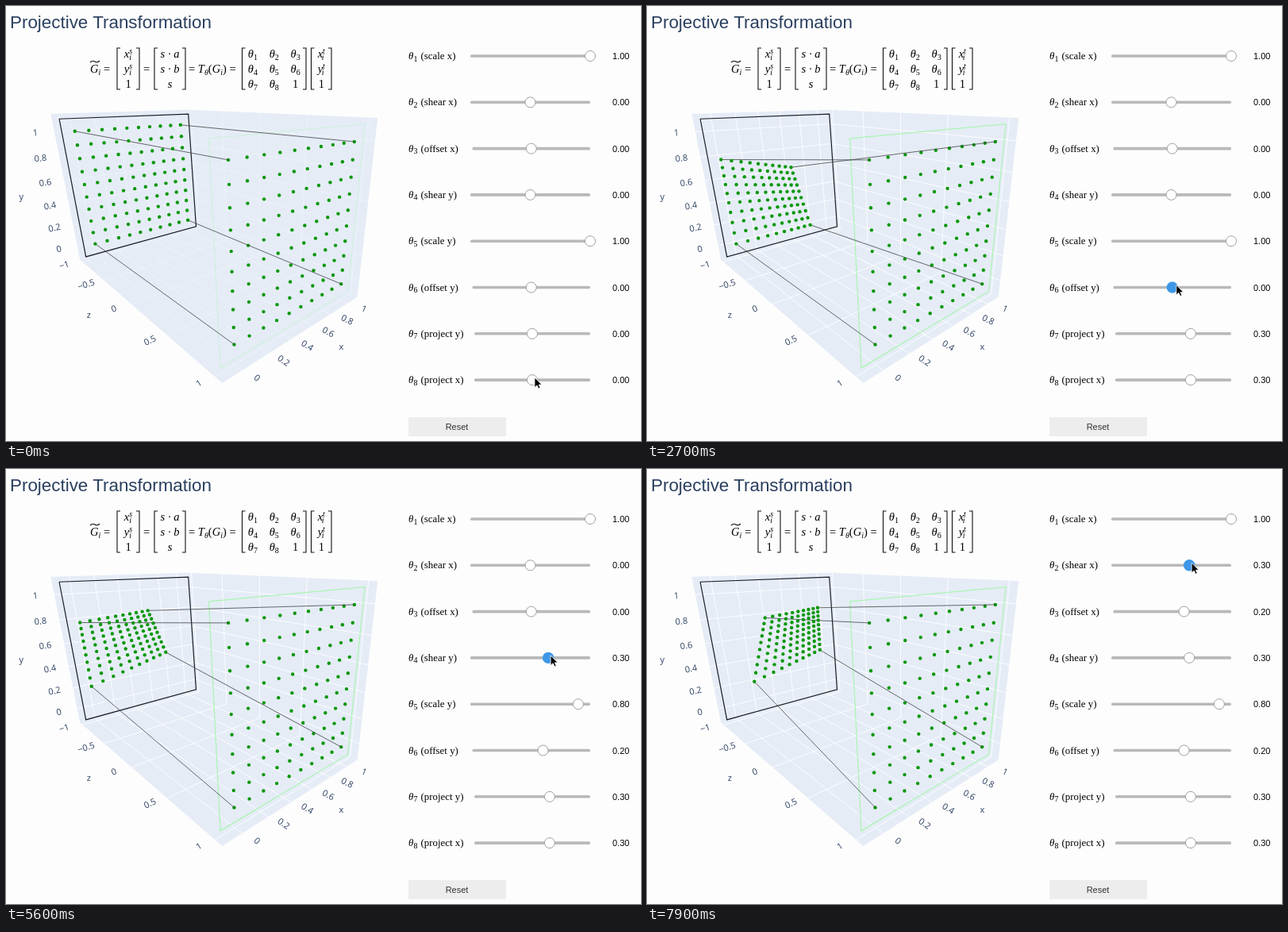
An HTML page for the animation above (8 s loop, 800 px wide and 548 px high).

```html
<!DOCTYPE html>
<html lang="en">
<head>
<meta charset="utf-8">
<title>Projective Transformation</title>
<style>
  html, body { margin: 0; width: 100%; height: 100%; overflow: hidden; background: #fdfdfd; }
  svg { display: block; }
  text { font: 11px "Liberation Sans", Arial, sans-serif; }
  .title { font-size: 22.4px; fill: #2a3f5f; }
  .math { font: 14.5px "Liberation Serif", "Times New Roman", serif; }
  .label { font: 12.9px "Liberation Serif", "Times New Roman", serif; }
  .small { font-size: 10px; }
  .it { font-style: italic; }
  .mid { text-anchor: middle; }
  .tick { font: 11px "Open Sans", sans-serif; fill: #2a3f5f; text-anchor: middle; }
</style>
</head>
<body>
<svg width="800" height="548" viewBox="0 0 800 548"><g id="still"></g><g id="live"></g></svg>
<script>
const LOOP = 8000, STEP = 100, PLOT_LAG = 130;
const corners = [[0, 1], [1, 1], [1, 0], [0, 0]];
const range = n => Array.from({ length: n }, (_, i) => i);
const repeat = (n, make) => range(n).map(make).join("");

const path = (points, attrs) =>
  `<path d="M${points.map(p => p.map(v => v.toFixed(2))).join("L")}" fill="none" ${attrs}/>`;
const text = (s, x, y, cls = "", more = "") => `<text x="${x}" y="${y}" class="${cls}" ${more}>${s}</text>`;

// ---- camera, fitted to the corners of the two frames ----
const frameCorners = {
  "-1": [[67, 142], [230, 136], [239, 278], [101, 316]],
  "1": [[255, 167], [452, 149], [431, 359], [270, 456]],
};
const padded = v => v ? 1.1 : -.1;

function solve(m) {
  const n = m[0].length - 1;
  for (const i of range(n)) for (const k of range(n)) {
    if (k === i) continue;
    const f = m[k][i] / m[i][i];
    m[k] = m[k].map((v, j) => v - f * m[i][j]);
  }
  return m.map((r, i) => r[n] / r[i]);
}

const equations = Object.entries(frameCorners).flatMap(([z, at]) => at.flatMap(([u, v], i) => {
  const p = [...corners[i].map(padded), +z], none = [0, 0, 0, 0];
  return [
    [...p, 1, ...none, ...p.map(c => -u * c), u],
    [...none, ...p, 1, ...p.map(c => -v * c), v],
  ];
}));
const camera = solve(range(11).map(i => range(12).map(j =>
  equations.reduce((sum, r) => sum + r[i] * r[j], 0))));

function project(...p) {
  const row = k => [...p, 1].reduce((sum, v, i) => sum + v * (camera[k + i] ?? 1), 0);
  return [row(0) / row(8), row(4) / row(8)];
}

// ---- plot ----
const lo = -.1375, hi = 1.1375, near = 1.0625, far = -near;
const unit = { from: lo, to: hi, ticks: range(6).map(i => i / 5) };
const depth = { from: far, to: near, ticks: range(5).map(i => i / 2 - 1) };
const faces = [
  [(a, b) => project(a, b, far), unit, unit],
  [(a, b) => project(hi, a, b), unit, depth],
  [(a, b) => project(a, lo, b), unit, depth],
];

const wall = ([at, a, b]) => path([at(a.from, b.from), at(a.to, b.from), at(a.to, b.to), at(a.from, b.to)],
  'style="fill:#e5ecf6"');
const gridLines = ([at, a, b]) => [
  ...a.ticks.map(v => [at(v, b.from), at(v, b.to)]),
  ...b.ticks.map(v => [at(a.from, v), at(a.to, v)]),
].map(line => path(line, 'stroke="#fff" stroke-opacity=".85"')).join("");
const frame = (z, color) => {
  const ring = corners.map(c => project(...c.map(padded), z));
  return path([...ring, ring[0]], `stroke="${color}" stroke-width="1.2"`);
};
const dot = ([x, y]) => `<circle cx="${x.toFixed(2)}" cy="${y.toFixed(2)}" r="2.2" fill="#0a970a"/>`;
const grid = range(100).map(i => [i % 10 / 9, Math.floor(i / 10) / 9]);

// Labels sit beyond an edge, in the direction in which the wall's grid lines leave it.
function axisLabel(s, edge, outside, distance) {
  const [x, y] = edge, turn = Math.atan((outside[1] - y) / (outside[0] - x));
  const side = Math.sign(outside[0] - x) * distance;
  const cx = x + 24 * side * Math.cos(turn), cy = y + 15 * side * Math.sin(turn);
  const degrees = distance > 1 ? 0 : turn * 180 / Math.PI;
  return text(s, cx, cy + 4, "tick", `transform="rotate(${degrees} ${cx} ${cy})"`);
}
const axes = [
  ["x", unit, .5, v => [[v, lo, near], [v, lo, near + .1]]],
  ["y", unit, .5, v => [[lo, v, far], [lo - .1, v, far]]],
  ["z", depth, 0, v => [[lo, lo, v], [lo - .1, lo, v]]],
];
const axisText = () => axes.map(([name, { ticks }, middle, ends]) => {
  const put = (s, v, distance) => axisLabel(s, ...ends(v).map(p => project(...p)), distance);
  return ticks.map(v => put(String(v).replace("-", "−"), v, 1)).join("") + put(name, middle, 2.4);
}).join("");

// ---- formula: "_" marks a subscript, "^" a superscript ----
const math = (s, x, y, cls = "") => text(s.replace(/([_^]?)(\S)/g, (_, mark, ch, at) =>
  `<tspan class="${/[\d()=]/.test(ch) ? "" : "it"} ${mark ? "small" : ""}" dx="${s[at - 2] === "^" ? -4 : 0}" ` +
  `baseline-shift="${{ _: -3, "^": 5 }[mark] ?? 0}">${ch}</tspan>`), x, y, "math " + cls);

function matrix(left, right, rows) {
  const bracket = (x, d) => path([[x + d, 53], [x, 53], [x, 105], [x + d, 105]], 'stroke="#111" stroke-width="1.1"');
  return bracket(left, 4) + bracket(right, -4) + rows.map((cells, r) => cells.map((s, c) =>
    math(s, left + (right - left) * (c + .5) / cells.length, 65 + 18.8 * r, "mid")).join("")).join("");
}
const formula = () =>
  '<path d="M106 71q3-3 6-1t6-1" fill="none" stroke="#111" stroke-width="1.1"/>' +
  math("G_i =", 106, 83.5) + matrix(140, 168, [["x^s_i"], ["y^s_i"], ["1"]]) +
  math("=", 173, 83.5) + matrix(187, 226, [["s · a"], ["s · b"], ["s"]]) +
  math("= T_θ(G_i) =", 230, 83.5) +
  matrix(297.5, 378, [["θ_1", "θ_2", "θ_3"], ["θ_4", "θ_5", "θ_6"], ["θ_7", "θ_8", "1"]]) +
  matrix(384.5, 410, [["x^t_i"], ["y^t_i"], ["1"]]);

// ---- sliders, dragged from the last up to the second ----
const goals = { scale: .8, shear: .3, offset: .2, project: .3 };
const dragTimes = [[100, 800], [1350, 1900], [2600, 3300], [3750, 4200], [5200, 5500], [6250, 6480], [7200, 7750]];
const sliders = ["scale x", "shear x", "offset x", "shear y", "scale y", "offset y", "project y", "project x"]
  .map((name, i) => ({
    name, y: 63 + 58.3 * i, left: 567.5 + 2.5 * name.length, right: 736,
    start: name.startsWith("scale") ? 1 : 0,
    goal: goals[name.split(" ")[0]],
    drag: dragTimes[7 - i] ?? [LOOP + 1000, LOOP + 2000],
  }));

const controls = () => sliders.map(({ name, left, right, y }, i) =>
  text("θ", 507, y + 4, "label it") + text(i + 1, 513.5, y + 6.5, "label small") +
  text(`(${name})`, 522.5, y + 4, "label") +
  `<rect x="${left}" y="${y - 1.8}" width="${right - left}" height="3.6" rx="1.5" fill="#b9b9b9"/>`).join("") +
  '<rect x="507" y="518" width="123" height="24" fill="#ededed"/>' + text("Reset", 568, 534, "mid", 'fill="#333"');

const progress = (t, a, b) => Math.min(1, Math.max(0, (t - a) / (b - a)));
const smooth = f => f * f * (3 - 2 * f);
const rawValue = ({ start, goal, drag }, t) => start + (goal - start) * progress(t, ...drag);
const valueAt = (slider, t) => Math.round(10 * rawValue(slider, t)) / 10;
const knobX = ({ left, right }, v) => (left + right) / 2 + v * (right - left) / 2;

// The pointer rides the knob, rests, then glides to the next one.
function pointerAt(t) {
  let x, y;
  for (const s of [...sliders].reverse().filter(s => s.goal && s.drag[0] < LOOP)) {
    const before = sliders[sliders.indexOf(s) + 1];
    const f = before ? smooth(progress(t, before.drag[1] + 300, s.drag[0] - 100)) : 1;
    const tip = [knobX(s, rawValue(s, t)) + 3, s.y - 3];
    x = before ? x + (tip[0] - x) * f : tip[0];
    y = before ? y + (tip[1] - y) * f : tip[1];
  }
  return [x, y];
}

function draw(t) {
  const th = sliders.map(s => valueAt(s, t - PLOT_LAG));
  const warp = ([x, y]) => {
    const s = th[6] * x + th[7] * y + 1;
    return project((th[0] * x + th[1] * y + th[2]) / s, (th[3] * x + th[4] * y + th[5]) / s, -1);
  };
  const links = corners.map(c => path([warp(c), project(...c, 1)], 'stroke="#444" stroke-width=".8"')).join("");
  const knobs = sliders.map(s => {
    const v = valueAt(s, t), active = t >= s.drag[0] && t <= s.drag[1] + 500;
    return `<circle cx="${knobX(s, v)}" cy="${s.y}" ` +
      (active ? 'r="7.2" fill="#3d97e8"/>' : 'r="6.5" fill="#fff" stroke="#a0a0a0"/>') +
      text(v.toFixed(2), 764, s.y + 4);
  }).join("");
  live.innerHTML = links + grid.map(p => dot(warp(p))).join("") + knobs +
    `<path transform="translate(${pointerAt(t)})" d="M0 0V12.5L3 9.8L5 14L7 13L5.2 9H9Z" stroke="#fff" stroke-width=".8"/>`;
  faint.setAttribute("opacity", t < STEP ? .35 : 1);
}

const still = document.getElementById("still"), live = document.getElementById("live");
still.innerHTML = text("Projective Transformation", 5, 28, "title") + formula() + faces.map(wall).join("") +
  `<g id="faint">${faces.map(gridLines).join("")}${frame(1, "#a9f5b0")}</g>` + frame(-1, "#1a1a24") +
  axisText() + grid.map(p => dot(project(...p, 1))).join("") + controls();
const faint = document.getElementById("faint");

const origin = performance.now();
function tick(now) {
  const t = Math.max(0, now - origin) % LOOP;
  draw(Math.floor(t / STEP) * STEP);
  requestAnimationFrame(tick);
}
tick(origin);
</script>
</body>
</html>
```
